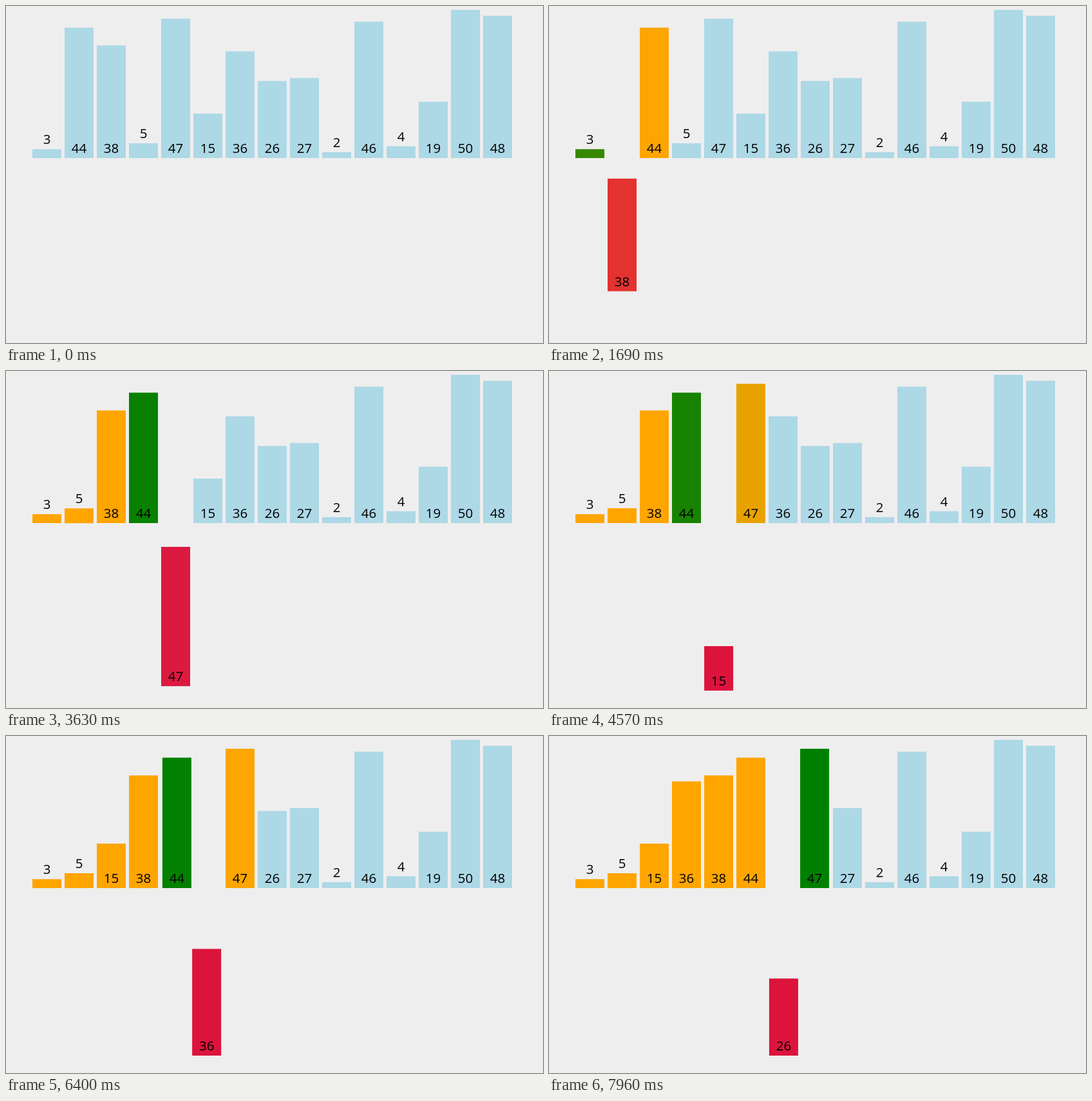
Write an HTML page with a canvas that moves like this. It is 834x523 px and loops after 8000 ms.

```html
<!DOCTYPE html>
<html lang="en">
<head>
<meta charset="utf-8">
<title>Insertion sort</title>
<style>
  html, body { margin: 0; width: 100%; height: 100%; overflow: hidden; background: #eee; }
  canvas { display: block; }
</style>
</head>
<body>
<canvas id="stage" width="834" height="523"></canvas>
<script>
const ctx = document.getElementById('stage').getContext('2d');
const VALUES = [3, 44, 38, 5, 47, 15, 36, 26, 27, 2, 46, 4, 19, 50, 48];
const BLUE = [173, 216, 230], ORANGE = [255, 165, 0], GREEN = [0, 128, 0], CRIMSON = [220, 20, 60];

const LOOP = 8000, TRANSITION = 225;
const FIRST_TICK = 150, TICK = 77.33, TICK_LEAD = 17;   // the picture refreshes in ticks

// [step, start in ms]; steps in between are evenly spaced
const PACE = [[1, 75], [9, 1613], [16, 3190], [17, 3370], [18, 3450], [23, 4396],
              [29, 5572], [36, 6962], [40, 7773]];

function stepStart(step) {
  const i = Math.max(1, PACE.findIndex(([s]) => s >= step));
  const [s0, t0] = PACE[i - 1], [s1, t1] = PACE[i];
  return t0 + (t1 - t0) * (step - s0) / (s1 - s0);
}

// Each snapshot holds, per bar, the vector [slot, drop, r, g, b].
function insertionSortSnapshots() {
  const bars = VALUES.map((value, slot) => ({ value, slot, drop: 0, color: BLUE }));
  const order = [...bars];
  const snapshots = [];
  const push = () => snapshots.push(bars.map(b => [b.slot, b.drop, ...b.color]));

  push();
  order[0].color = ORANGE;
  push();
  for (let i = 1; i < order.length; i++) {
    const key = order[i];
    key.drop = 1;
    key.color = CRIMSON;
    push();
    for (let j = i - 1; j >= 0; j--) {
      const other = order[j];
      other.color = GREEN;
      push();
      if (other.value > key.value) {
        [order[j], order[j + 1]] = [key, other];
        key.slot = j;
        other.slot = j + 1;
        push();
        other.color = ORANGE;
      } else {
        other.color = ORANGE;
        break;
      }
    }
    key.drop = 0;
    key.color = ORANGE;
    push();
  }
  return snapshots;
}

const lastStep = PACE[PACE.length - 1][0];
const snapshots = insertionSortSnapshots().slice(0, lastStep + 1);
const starts = snapshots.map((_, step) => step ? stepStart(step) : 0);

const easeCubic = u => u < 0.5 ? 4 * u ** 3 : 1 - 4 * (1 - u) ** 3;

// A new step interrupts the running transition and continues from where it is.
function poseAt(time) {
  let pose = snapshots[0];
  for (let step = 1; step <= lastStep && starts[step] < time; step++) {
    const end = Math.min(time, starts[step + 1] ?? Infinity);
    const p = easeCubic(Math.min(1, (end - starts[step]) / TRANSITION));
    pose = pose.map((bar, i) => bar.map((v, k) => v + (snapshots[step][i][k] - v) * p));
  }
  return pose;
}

function drawBar(value, [slot, drop, ...rgb]) {
  const x = 41 + 50 * slot, bottom = 236 + 260 * drop, height = 4.6 * value;
  ctx.fillStyle = `rgb(${rgb.map(Math.round)})`;
  ctx.fillRect(x, bottom - height, 45, height);
  ctx.fillStyle = '#000';
  ctx.fillText(value, x + 22.5, (value < 10 ? bottom - height : bottom) - 8);
}

function draw(time) {
  const tick = Math.floor((time - FIRST_TICK + TICK_LEAD) / TICK);
  const pose = poseAt(tick < 0 ? 0 : FIRST_TICK + tick * TICK);
  ctx.fillStyle = '#eee';
  ctx.fillRect(0, 0, 834, 523);
  ctx.font = '20.5px "Open Sans", "Noto Sans", sans-serif';
  ctx.textAlign = 'center';
  VALUES.forEach((value, i) => drawBar(value, pose[i]));
}

const origin = performance.now();
function frame() {
  draw((performance.now() - origin) % LOOP);
  requestAnimationFrame(frame);
}
frame();
</script>
</body>
</html>
```
